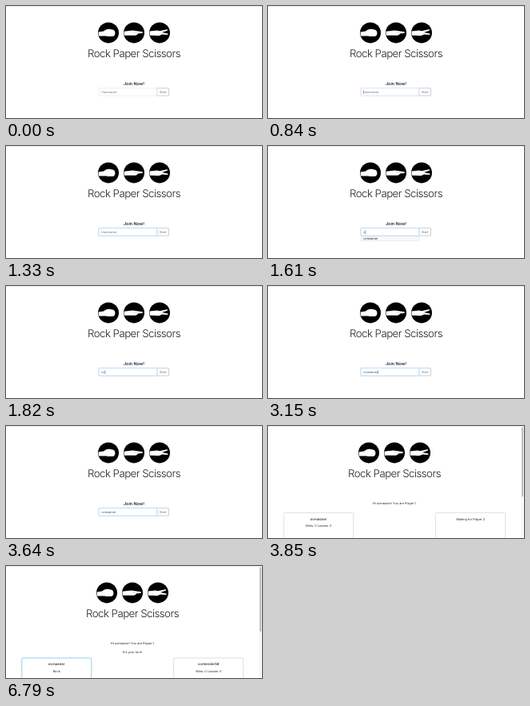
These frames come from a looping animation (320 by 140 pixels, 8 s). An HTML page:

```html
<!DOCTYPE html>
<html lang="en">
<head>
<meta charset="utf-8">
<title>Rock Paper Scissors</title>
<style>
html, body { margin: 0; width: 100%; height: 100%; overflow: hidden; background: #fff; }
svg { display: block; width: 320px; height: 140px; }
text { font: 400 3.9px Inter, "Open Sans", sans-serif; fill: #212529; text-rendering: geometricPrecision; }
.mid { text-anchor: middle; }
.title { font-size: 13.3px; font-weight: 300; letter-spacing: -.55px; }
.join { font-size: 5.4px; font-weight: 600; }
.name { font-size: 4.4px; font-weight: 500; }
.hand { fill: #fff; }
.box { fill: #fff; stroke: #c9ccd0; stroke-width: .6; }
.muted { fill: #6c757d; }
.typed { fill: #495057; }
</style>
</head>
<body>
<svg viewBox="0 0 320 140">
  <rect width="320" height="140" fill="#fff"/>
  <path d="M0 .5H320" stroke="#e4e4e4" stroke-width=".8"/>

  <g id="header">
    <g transform="translate(128 33.4)">
      <circle r="13"/>
      <path class="hand" d="M-12.4-.8L-6-2Q-3-4.8 1-4.6L6-3.6Q8.6-2.5 8.4 1Q8 4.2 5 4.5Q0 5-3 4L-12.2 4.2Z"/>
    </g>
    <g transform="translate(160 33.4)">
      <circle r="13"/>
      <path class="hand" d="M-12.5-1.6L-4-2.7Q-1-3.4 2-2.3L10.5-1.2Q11.6-.3 10.2.6L5 1Q4 3.3 0 3.4L-12.3 3.4Z"/>
      <path d="M0 0L8-.2" stroke="#999" stroke-width=".3"/>
    </g>
    <g transform="translate(192 33.4)">
      <circle r="13"/>
      <path class="hand" d="M-12.5-1.8L-3-2.8L0-2.2L9-4.2Q11-3.9 9.6-2.7L3-.5L10.2 1Q11.5 1.9 9.8 2.5L3 2.2Q0 4.4-4 3.7L-12.3 3.4Z"/>
    </g>
    <text class="mid title" x="160" y="64.3">Rock Paper Scissors</text>
  </g>

  <g id="login">
    <text class="mid join" x="160" y="99.2">Join Now!</text>
    <rect x="188.6" y="102.7" width="14.9" height="9.4" rx=".8" fill="#fff" stroke="#8b9197" stroke-width=".45"/>
    <text class="mid muted" x="196.1" y="108.9">Start</text>
    <rect x="116.1" y="102.7" width="72.5" height="9.4" rx=".8" fill="#fff" stroke="#d5dade" stroke-width=".4"/>
    <g id="focus">
      <rect x="115.7" y="102.3" width="73.3" height="10.2" rx="1.2" fill="none" stroke="#d6eaff" stroke-width=".9"/>
      <rect x="116.1" y="102.7" width="72.5" height="9.4" rx=".8" fill="#fff" stroke="#92c5f8" stroke-width=".45"/>
    </g>
    <text id="placeholder" class="muted" x="119.3" y="108.9">Username</text>
    <text id="typed" class="typed" x="119.3" y="108.9"></text>
    <rect id="caret" y="105.2" width=".4" height="4.8" fill="#333"/>
    <g id="suggestion">
      <rect x="116.4" y="112.9" width="72" height="5.8" fill="#f8f8f8" stroke="#d2d2d2" stroke-width=".4"/>
      <text class="player" x="119.3" y="117.1"></text>
    </g>
  </g>

  <g id="game">
    <text id="greeting" class="mid" x="158" y="98.2"></text>
    <text id="turn" class="mid" x="158" y="108.6">It's your turn!</text>
    <g id="cards">
      <rect id="leftCard" class="box" x="19.8" y="108.3" width="87" height="60" rx="1"/>
      <text class="mid name player" x="63.2" y="117.8"></text>
      <text id="leftInfo" class="mid" x="63.2" y="126.2"></text>
      <rect class="box" x="209.6" y="108.3" width="87" height="60" rx="1"/>
      <text id="waiting" class="mid" x="253.2" y="117.8">Waiting for Player 2</text>
      <g id="opponent">
        <text class="mid name" x="253.2" y="117.8">contender58</text>
        <text class="mid" x="253.2" y="126.2">Wins: 0 Losses: 0</text>
      </g>
    </g>
    <rect x="316" y="1" width="4" height="139" fill="#f8f8f8"/>
    <rect id="thumb" x="317" y="1.5" width="2.3" rx="1.15" fill="#c1c1c1"/>
  </g>
</svg>
<script>
const LOOP = 8000, FOCUS = 840, JOINED = 3850, PLAYING = 6790, BLINK = 490;
const KEYS = [1610, 1820, 2030, 2240, 2590, 2730, 2870, 3150];
const PLAYER = "ovmasner", SCORE = "Wins: 0 Losses: 0";

const el = id => document.getElementById(id);
const show = (id, on) => el(id).setAttribute("display", on ? "inline" : "none");

document.querySelectorAll(".player").forEach(node => node.textContent = PLAYER);
el("greeting").textContent = `Hi ${PLAYER}! You are Player 1`;

function drawLogin(t) {
  const count = KEYS.filter(key => t >= key).length;
  const lastInput = count ? KEYS[count - 1] : FOCUS;
  const typed = el("typed");
  typed.textContent = PLAYER.slice(0, count);
  el("focus").setAttribute("opacity", t < FOCUS ? 0 : t < FOCUS + 70 ? .5 : 1);
  el("caret").setAttribute("x", 119.3 + (count ? typed.getComputedTextLength() : 0));
  show("caret", t >= FOCUS && t - lastInput < BLINK);
  show("placeholder", !count);
  show("suggestion", count === 1);
}

function drawGame(playing) {
  const card = el("leftCard");
  card.style.stroke = playing ? "#8ccaee" : "";
  card.style.strokeWidth = playing ? .9 : "";
  el("cards").setAttribute("transform", `translate(0 ${playing ? 6.7 : 0})`);
  el("thumb").setAttribute("height", playing ? 80.5 : 87);
  el("leftInfo").textContent = playing ? "Rock" : SCORE;
  show("turn", playing);
  show("waiting", !playing);
  show("opponent", playing);
}

function render(t) {
  const joined = t >= JOINED;
  el("header").setAttribute("transform", `translate(${joined ? -2 : 0} 0)`);
  show("login", !joined);
  show("game", joined);
  if (joined) drawGame(t >= PLAYING);
  else drawLogin(t);
}

const start = performance.now();
function tick() {
  render((performance.now() - start) % LOOP);
  requestAnimationFrame(tick);
}
tick();
</script>
</body>
</html>
```
